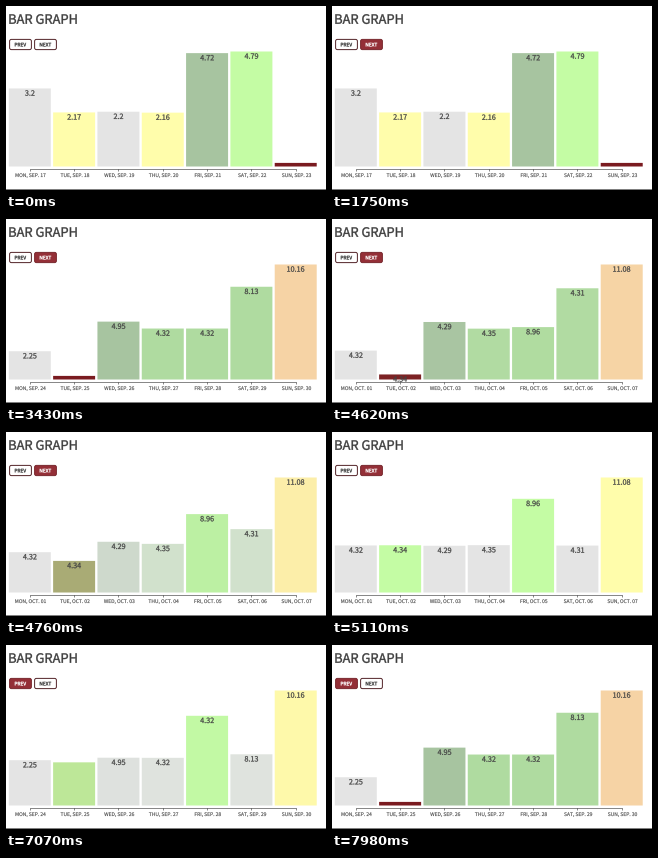
Recreate the animation shown at these times as a matplotlib script. Size 320x185 px, loop 8000 ms.

```python
import matplotlib.pyplot as plt
from matplotlib.animation import FuncAnimation
from matplotlib.collections import PolyCollection
from matplotlib.colors import to_rgb
from matplotlib.patches import FancyBboxPatch, PathPatch, Rectangle
from matplotlib.path import Path
from matplotlib.textpath import TextPath
from matplotlib.transforms import Affine2D
import numpy as np

W, H, DPI = 320, 185, 100
LOOP, INTERVAL, TICK = 8000, 40, 70
PX = 72 / DPI
BASE, STUB, SPAN = 160.5, 3.6, 111.4
LEFT, PITCH, BAR_W = 2.8, 44.32, 42

GREY, YELLOW, SAGE, LIME = "#e4e4e4", "#fffdab", "#a7c4a0", "#c4fca4"
GREEN, PEACH, MAROON = "#afdba0", "#f6d3a5", "#7a1b20"
INK, RED, BORDER = "#3c3c3c", "#942f37", "#55272b"

DAYS = ["MON", "TUE", "WED", "THU", "FRI", "SAT", "SUN"]
centers = LEFT + BAR_W / 2 + PITCH * np.arange(7)

plt.rcParams["font.family"] = "Noto Sans CJK JP"
fig = plt.figure(figsize=(W / DPI, H / DPI), dpi=DPI, facecolor="white")
ax = fig.add_axes([0, 0, 1, 1])
ax.set(xlim=(0, W), ylim=(H, 0))
ax.axis("off")


def text_path(s, size, x=0, y=0, center=True):
    path = TextPath((0, 0), s, size=size)
    box = path.get_extents()
    x -= (box.x0 + box.x1) / 2 if center else box.x0
    return Affine2D().scale(1, -1).translate(x, y).transform_path(path)


def add_text(path, color=INK, weight=0.2):
    patch = PathPatch(path, fc=color, ec=color, lw=weight * PX, zorder=4)
    return ax.add_patch(patch)


class Week:
    def __init__(self, month, first, values, colors):
        v = np.array(values)
        self.heights = STUB + SPAN * v / v.max()
        self.colors = np.array([to_rgb(c) for c in colors])
        self.values = [(i, text_path(f"{x:g}", 7.2, centers[i]))
                       for i, x in enumerate(values) if x]
        self.dates = Path.make_compound_path(*[
            text_path(f"{d}, {month}. {first + i:02d}", 4.95,
                      centers[i] + 0.8, 171)
            for i, d in enumerate(DAYS)])

    def value_path(self, heights):
        return Path.make_compound_path(*[
            Path(p.vertices + [0, BASE - heights[i] + 7.2], p.codes)
            for i, p in self.values])


sep17 = Week("SEP", 17, [3.2, 2.17, 2.2, 2.16, 4.72, 4.79, 0],
             [GREY, YELLOW, GREY, YELLOW, SAGE, LIME, MAROON])
sep24 = Week("SEP", 24, [2.25, 0, 4.95, 4.32, 4.32, 8.13, 10.16],
             [GREY, MAROON, SAGE, GREEN, GREEN, GREEN, PEACH])
oct01 = Week("OCT", 1, [4.32, 4.34, 4.29, 4.35, 8.96, 4.31, 11.08],
             [GREY, LIME, GREY, GREY, LIME, GREY, YELLOW])

# label switch, start of the bar motion, duration, week before, week after
MOVES = [(2730, 2786, 500, sep17, sep24),
         (4539, 4539, 400, sep24, oct01),
         (6900, 6900, 350, oct01, sep24)]


def mix(a, b, p):
    return tuple(np.array(to_rgb(a)) * (1 - p) + np.array(to_rgb(b)) * p)


def ramp(t, start, length):
    return min(max((t - start) / length, 0), 1)


def cubic(u):
    return 4 * u ** 3 if u < 0.5 else 1 - 4 * (1 - u) ** 3


class Button:
    def __init__(self, x, text):
        self.box = ax.add_patch(FancyBboxPatch(
            (x + 0.6, 33.4), 21.8, 10.2, lw=PX, zorder=2,
            boxstyle="round,pad=0,rounding_size=1.8"))
        self.label = add_text(text_path(text, 4.8, x + 11.5, 40.4), weight=0.3)

    def heat(self, p):
        self.box.set(facecolor=mix("white", RED, p),
                     edgecolor=mix(BORDER, "#7a2a30", p))
        ink = mix(INK, "white", p)
        self.label.set(facecolor=ink, edgecolor=ink)


add_text(text_path("BAR GRAPH", 12.9, 3.4, 17.8, center=False), weight=0.35)
prev_button, next_button = Button(3, "PREV"), Button(28, "NEXT")

bars = PolyCollection([], linewidths=0, zorder=1)
bars.set_snap(False)
ax.add_collection(bars, autolim=False)
value_text = add_text(sep17.value_path(sep17.heights), "#444444", 0.25)
date_text = add_text(sep17.dates, "#4a4a4a", 0.12)

ticks = [Path([(c, 162.5), (c, 165)]) for c in centers]
rule = Path([(centers[0], 162.5), (centers[-1], 162.5)])
ax.add_patch(PathPatch(Path.make_compound_path(rule, *ticks), fill=False,
                       ec="#6a6a6a", lw=0.8 * PX, zorder=2))
ax.add_patch(Rectangle((0, 183.5), W, 2, fc="black", lw=0, snap=False))


def draw(frame):
    t = int((frame + 0.5) * INTERVAL) // TICK * TICK
    old = new = sep17
    p = 1
    for switch, start, length, before, after in MOVES:
        if t >= switch:
            old, new, p = before, after, cubic(ramp(t, start, length))

    heights = old.heights + (new.heights - old.heights) * p
    half = BAR_W / 2
    bars.set_verts([[(c - half, BASE), (c - half, BASE - h),
                     (c + half, BASE - h), (c + half, BASE)]
                    for c, h in zip(centers, heights)])
    bars.set_facecolor(old.colors + (new.colors - old.colors) * p)
    value_text.set_path(new.value_path(heights))
    date_text.set_path(new.dates)

    back = ramp(t, 5470, 340)
    next_button.heat(ramp(t, 1200, 340) - back)
    prev_button.heat(back)
    return []


anim = FuncAnimation(fig, draw, frames=LOOP // INTERVAL, interval=INTERVAL,
                     init_func=lambda: draw(0), repeat=True)
plt.show()
```
